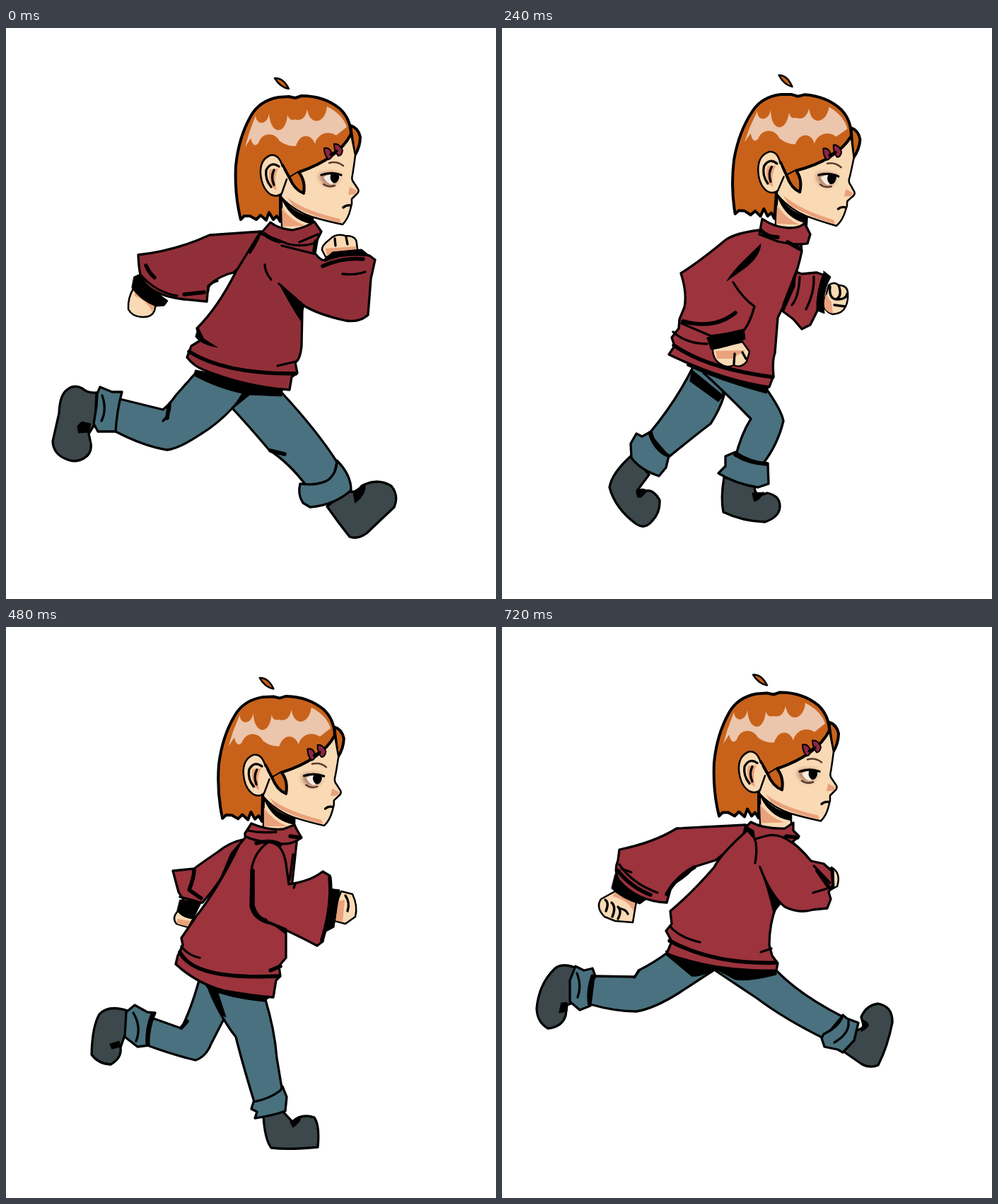
These frames come from a looping animation (693 by 808 pixels, 800 ms). An HTML page:

```html
<!DOCTYPE html>
<html lang="en">
<head>
<meta charset="utf-8">
<title>Running girl</title>
<style>
html, body { margin: 0; width: 100%; height: 100%; overflow: hidden; background: #fff; }
svg { display: block; width: 100%; height: 100%; }
path { stroke: #000; stroke-width: 3.3; stroke-linejoin: round; stroke-linecap: round; }
.j { fill: #4a717f; }
.b { fill: #3c484c; }
.s { fill: #9c333d; }
.r { fill: #912f38; }
.n { fill: #f9dab4; stroke-width: 2.5; }
.o { fill: #e9a27c; stroke: none; }
.k { fill: #000; stroke-width: 1; }
.l { fill: none; }
.t { fill: none; stroke-width: 5.5; }
.h { fill: #c8621a; stroke-width: 4; }
.a { fill: #c8621a; stroke-width: 2.5; }
.p { fill: #ebc5ac; stroke: none; }
.w { fill: #f4ece4; stroke: none; }
.c { fill: #8b2644; stroke-width: 2; }
.e { fill: #b07a64; stroke: none; filter: url(#soft); }
.m { fill: none; stroke: #5a3c30; stroke-width: 2.5; }
</style>
</head>
<body>
<svg id="stage" viewBox="0 0 693 808">
<defs><filter id="soft" x="-50%" y="-50%" width="200%" height="200%"><feGaussianBlur stdDeviation="3"/></filter></defs>
</svg>
<script>
// Every entry is a style letter followed by its path.
const head = [
  'n M390 238L390 290L434 290L434 262Z',
  'h M487 138Q498 141 501 154Q501 168 493 181Z',
  'n M488 150L494 180Q492 196 490 208Q488 215 492 219L498 228Q500 232 495 236L489 242L489 249L487 257Q484 270 476 278Q452 273 432 267Q406 258 388 238L392 190Z',
  'o M398 240Q420 258 472 270L474 276Q430 266 406 252Z',
  'o M390 254Q402 272 424 280L391 281Z',
  'k M387 234Q402 262 434 268L433 277Q400 272 387 234Z',
  'o M486 225L496 230L494 235L484 236Z',
  'e M443 207Q456 202 472 207Q468 224 455 223Q444 220 443 207Z',
  'w M449 211Q461 203 474 210Q470 220 459 221Q452 218 449 211Z',
  'k M460 207Q469 203 471 211Q469 220 463 219Q457 214 460 207Z',
  'l M446 208Q460 203 474 208',
  'm M449 221Q456 226 465 223',
  'm M457 191Q468 188 477 195',
  'l M477 254Q481 250 487 251',
  'h M332 271Q323 235 325 195Q329 155 346 125Q358 103 385 98L400 97L409 99L418 96Q450 96 472 114Q487 128 488 150Q470 185 414 204L401 212L391 194L388 240L388 274L383 266L378 271L372 261L368 272L360 265L354 271L345 266L337 266Z',
  'p M338 169L344 148L353 124C354 138 370 138 372 121C374 152 396 152 398 123C402 134 408 128 411 130C420 131 424 125 426 115C430 140 452 135 454 111Q476 122 482 140L467 152C455 144 440 150 437 164C432 150 416 148 410 167Q398 168 387 160C380 147 362 147 357 163Q350 171 346 156Z',
  'n M391 196Q386 178 374 180Q359 186 360 206Q362 228 375 236Q384 240 390 234L397 214',
  'o M373 200Q370 211 376 225L383 230Q378 211 385 199Z',
  'l M386 196Q375 188 368 201Q366 214 375 225',
  'l M379 201Q374 211 379 222',
  'h M414 204Q424 216 421 234Q408 229 401 212',
  'c M450 170Q458 168 461 178Q461 185 456 186Q450 180 450 170Z',
  'c M464 164Q472 163 476 173Q475 181 470 181Q464 174 464 164Z',
  'l M459 179L468 174',
  'a M380 71Q392 70 400 86Q388 84 380 71Z'
];

const legs = {
  land: [
    'j M270 486L240 520Q232 532 222 540L157 524L153 570Q195 592 228 597Q245 595 275 575Q300 560 322 536L340 514Z',
    'l M232 530Q233 546 222 556', 't M230 536L228 552',
    'b M128 516Q115 517 108 510Q95 503 84 514Q76 522 75 545L66 585Q67 603 85 610Q98 616 110 609Q122 602 120 588L117 574L126 560Z',
    'k M101 563L107 557L120 560L117 572L103 573Z',
    'j M129 517L133 508L150 515L164 515Q157 540 155 571L130 571L124 560L128 535Z',
    'l M136 520Q143 540 135 556',
    'j M320 538L345 514L390 516Q440 570 468 614L462 640L425 648Q400 615 372 597Q345 565 320 538Z',
    't M374 598L394 603',
    'b M454 677L482 655Q495 660 503 648Q525 636 545 648Q556 662 549 678L510 715Q497 724 486 720Q470 700 454 677Z',
    'k M491 656L508 645Q510 660 494 672Z',
    'j M416 645Q412 660 420 672L430 678Q465 675 488 654Q488 632 468 612Q468 630 455 640Q440 648 416 645Z',
    'k M268 484L392 508L390 521L345 519L320 539L334 517Q300 510 266 492Z'
  ],
  plant: [
    'j M266 480Q258 520 246 548L244 552L196 554L193 587Q230 608 262 608Q283 606 292 585L330 517Z',
    't M228 552L244 552',
    'b M165 545Q140 540 128 543Q122 560 120 615Q125 624 140 626L158 624Q168 615 165 600L160 580Z',
    'k M148 584L161 583L158 592L149 592Z',
    'j M163 543L175 538L184 546L200 544L193 556L193 600L184 603L166 598L160 580Z',
    'l M172 546Q182 566 175 590',
    'j M308 557L330 515L358 515Q375 580 384 634L345 648Q330 600 308 557Z',
    'k M316 512L331 517L325 541Q318 552 309 557Z',
    'b M356 672L366 725Q372 732 390 732L440 728Q448 710 447 688Q435 670 415 680Q405 690 395 682L391 662Z',
    'k M394 683L412 680L410 694L398 696Z',
    'j M334 645Q336 665 345 673Q375 680 398 662L402 650L388 626Q388 640 372 645Q355 650 334 645Z',
    'k M264 478L265 494Q310 512 357 521L362 508Z'
  ],
  pass: [
    'j M264 486L338 508Q328 590 314 646L272 648Q272 570 264 486Z',
    'b M268 662L264 715Q268 728 290 728L338 727Q350 720 346 700Q336 686 318 692L312 664Z',
    'k M304 695L320 690L318 703L306 706Z',
    'j M262 640Q292 648 320 636L324 662Q295 674 264 664Z',
    'j M304 502L358 512Q378 555 372 582Q350 605 276 638L262 602Q310 580 325 565Q312 535 304 502Z',
    'b M250 604Q228 602 216 616Q205 640 214 668Q228 676 240 666Q246 655 238 650L262 644Z',
    'j M250 600L268 592Q272 616 286 634L262 648L246 622Z',
    'k M264 482L264 496Q310 514 357 521L362 508Z'
  ],
  push: [
    'j M270 480Q245 530 208 574L236 607Q275 575 295 560Q308 540 314 520L304 488Z',
    'k M269 484L313 520L306 529L266 500Z',
    'b M184 604Q155 630 152 650Q160 680 190 702Q202 710 212 698Q224 686 223 668Q214 652 203 655L195 663L191 655L208 632Z',
    'k M190 657Q197 648 206 655L197 664L192 664Z',
    'j M182 588L190 574L198 578L211 571Q218 600 236 605L232 622L222 634Q195 625 183 608Z',
    't M209 573Q217 598 235 605',
    'j M285 485L372 508Q395 540 398 556Q390 590 368 618L330 608Q338 575 352 553L345 546Q320 520 285 488Z',
    'b M314 636Q309 665 313 685Q340 698 372 699Q392 692 393 678Q394 662 375 658Q362 664 358 655L356 646Z',
    'k M354 658L371 657Q365 668 357 670Z',
    'j M316 606L330 600Q350 614 376 616L377 645L362 650Q330 645 306 630L316 620Z',
    't M330 604Q350 616 374 617',
    'k M262 470Q310 490 377 508L374 517Q310 500 262 478Z'
  ],
  fly: [
    'j M222 458L190 484Q185 490 180 490L118 490L115 526Q170 540 208 540Q225 532 250 512L290 484Z',
    't M181 490L188 485',
    'b M84 492Q80 480 62 478Q50 482 45 500L24 560Q30 576 52 580Q68 578 71 565L70 535L84 526Z',
    'k M61 534L70 533L70 544L63 544Z',
    'j M84 492L92 476L105 481L116 476L122 490Q112 510 117 530L105 538L90 530L82 520Z',
    't M117 490Q111 510 116 528', 'l M95 485Q104 505 97 525',
    'j M284 485L374 476Q424 512 488 546L465 578Q420 560 385 538Q340 512 284 485Z',
    'b M495 595L508 563Q522 565 526 550Q527 520 540 513Q560 515 563 540Q562 575 545 606Q535 616 520 612L495 598Z',
    'k M522 563L526 535Q535 545 530 560Z',
    'j M457 575Q458 588 470 597L490 600Q505 590 508 570L508 550L488 540Q486 556 478 568Z',
    'l M497 548Q496 575 468 587',
    'k M216 456Q300 482 379 474L378 484Q330 492 286 486Q250 482 218 464Z'
  ],
  plant2: [
    'j M273 500Q262 540 248 568L206 553L200 592Q235 605 268 613Q283 608 290 590L308 555L300 515Z',
    't M248 567L256 558',
    'b M172 543Q145 534 132 548Q122 565 121 605Q130 618 148 619Q164 610 162 595L170 572Z',
    'k M147 590L160 586L162 594L150 597Z',
    'j M170 545L182 535L200 545L211 546Q200 570 202 592L186 594L168 580Z',
    'l M180 546Q192 566 184 586', 't M207 548Q199 568 200 590',
    'j M288 510L366 524Q380 570 383 610L391 658L352 675Q335 620 325 580Q305 555 288 515Z',
    'k M284 508L300 518L311 552L304 548Z',
    'b M364 692Q366 725 375 737Q400 740 441 736Q444 705 436 694Q418 688 405 700L392 686Z',
    'k M402 700L416 694Q418 700 406 708Z',
    'j M347 682L350 672Q372 668 388 656L391 650L397 665L395 685Q375 692 352 695L355 686Z',
    'k M276 498Q330 518 381 518L365 530Q315 525 286 512Z'
  ],
  push2: [
    'j M260 484Q235 535 202 572L230 602Q255 588 270 575Q300 545 322 508Z',
    'b M176 600Q150 622 146 640Q155 670 172 687L205 689Q220 680 219 662Q210 650 198 656L193 663L190 650L206 628Z',
    'k M190 652L201 650L204 656L193 664Z',
    'j M172 586L186 568L191 574L204 568Q210 590 232 600L228 622L216 632Q190 620 174 602Z',
    't M202 570Q210 590 230 600',
    'j M313 514L368 504Q395 530 403 553Q395 580 360 622L330 608Q340 580 350 558L352 551Q335 535 313 514Z',
    't M345 551L350 557',
    'b M303 632L304 680Q320 694 345 694L376 693Q384 685 382 668Q375 648 358 652L352 646Z',
    'k M348 656L359 650Q368 652 355 664Z',
    'j M302 622L316 602L328 606Q345 619 360 624L356 648Q325 648 302 632Z',
    'k M258 482Q310 498 372 500L370 510L325 509L314 518L309 508Q270 500 258 488Z'
  ],
  fly2: [
    'j M235 460Q215 475 193 486L188 495L130 494L125 534Q160 544 190 544Q215 540 250 518L302 484Z',
    'l M194 486L187 496',
    'b M104 482Q85 475 75 483Q52 505 49 540Q50 560 65 568Q85 566 90 550L92 535L100 532Z',
    'k M84 532L92 531L92 544L81 546Z',
    'j M96 500L104 480L116 486L128 483L132 494Q120 515 125 536L110 542L96 530Z',
    't M128 494Q121 515 124 534', 'l M106 490Q113 508 107 524',
    'j M300 485L386 484Q420 520 481 551L455 582Q400 555 360 525Q330 505 300 485Z',
    'b M482 600L500 572L512 566L508 552Q515 535 532 533Q553 537 552 560Q545 595 532 620Q520 625 508 618Z',
    'k M508 572L511 556Q524 562 514 569Z',
    'j M452 582L456 594L475 598L482 602L498 585L504 560L488 554L482 549Q478 565 455 576Z',
    'l M490 558Q492 575 470 588',
    'k M232 458L300 478L388 484L388 492Q350 502 330 499L302 484Q280 496 268 494L232 464Z'
  ]
};

const upper = {
  land: [
    'n M180 369Q172 382 173 398Q178 408 192 409Q206 410 210 400L212 390Z',
    'o M182 373L210 391L207 402Q200 386 182 379Z',
    'k M181 352L190 348Q208 372 229 386L224 393L212 394Q190 385 178 368Z',
    'r M360 288L288 293Q240 315 187 321Q188 345 191 351Q200 378 252 384L284 387L286 365Q302 350 322 346L352 318Z',
    't M198 336Q202 346 210 353', 'l M190 349Q212 374 242 379', 't M252 377L280 374', 'l M286 372Q285 362 299 358',
    'r M360 288L325 345Q300 395 270 425L275 442L262 450L256 466Q265 478 280 484Q340 508 401 512L404 494L412 488L409 473Q416 470 418 450L419 400L436 325L441 296Z',
    'k M272 424L280 440L299 452Q274 447 268 437Z',
    't M259 458Q310 490 410 489', 'l M384 478L410 472',
    'n M447 314Q446 308 458 299Q466 290 480 294Q496 294 496 305L498 320L452 324Z',
    'o M452 312L494 309L498 320L454 322Z', 'l M465 298L466 308', 'l M481 296L483 306',
    'k M450 327L462 317L503 313L514 322L452 334Z',
    'r M386 362L420 392Q440 405 480 414Q500 417 512 406L516 355L522 328L514 322Q480 318 456 327Q448 333 438 320L390 308',
    'k M386 361L420 390L418 416Q402 392 386 361Z',
    't M448 337Q476 324 505 327', 'l M476 348Q495 350 508 345',
    'l M366 335Q366 345 375 356', 'l M360 290Q352 308 345 318',
    'r M362 289L374 275Q385 284 405 286Q425 282 436 274L446 288L438 304Q420 310 400 306Q380 298 362 292Z',
    't M366 292Q375 299 387 302', 'l M415 303L441 292', 't M438 302L436 316'
  ],
  plant: [
    'n M238 408Q232 420 233 432Q245 440 260 434L268 412Z',
    'o M236 424L260 430L254 437Q242 437 236 432Z',
    'k M238 397Q255 406 284 400L272 415Q250 416 238 406Z',
    's M355 297Q320 300 300 312Q270 340 247 370L234 378Q240 395 250 402L280 405L330 330Z',
    'l M247 372Q260 390 284 392', 't M238 380Q252 396 275 398',
    's M366 288L350 298Q320 345 300 365Q280 390 270 420Q262 435 255 440L252 458L247 463L246 470Q300 500 387 515L392 494L402 490L400 474Q408 470 409 440L410 410L420 350Q435 310 432 294Z',
    'k M264 418L270 437L257 438Z', 't M252 456Q310 486 400 490', 'l M382 478L400 472',
    'n M483 372L495 365Q510 368 510 380Q518 392 511 402Q508 416 495 416L484 410Z',
    'o M484 373L492 372L490 411L484 409Z', 'l M494 367L498 380L510 376', 'l M500 402L511 401',
    'k M460 361L470 366L483 370Q477 392 483 417L470 422Q478 390 460 361Z',
    's M380 301Q394 308 395 325L395 362Q410 368 425 362L445 351Q455 354 470 370L470 410L465 432L452 447Q410 430 375 418Q352 412 346 405L344 345Q345 318 367 302',
    't M446 364Q464 384 460 402L446 427', 't M456 416L460 433', 't M398 364L420 364',
    'k M376 417L410 431L409 439Q392 433 376 417Z', 'l M424 345L420 358',
    's M364 289L374 273Q385 285 405 287Q425 284 432 276L442 288L437 299Q415 309 390 301L368 295Z',
    'l M366 290Q382 294 390 301', 't M363 300L384 302', 't M413 304L434 298'
  ],
  push: [
    'n M462 364Q470 358 476 364Q488 364 489 374Q490 386 486 394Q482 404 468 405Q456 402 455 390Z',
    'o M458 376L466 388L468 404Q456 402 455 390Z', 'l M464 366Q462 382 472 384Q482 380 476 364', 'l M474 384Q487 384 488 376', 'l M470 392L485 394',
    's M416 345L424 348L445 346L456 350Q445 375 446 400L436 420L424 426L412 412L396 400Z',
    'k M455 344L465 352Q452 375 456 404L446 400Q444 370 455 346Z',
    'l M421 352Q420 380 410 392', 'l M441 352Q442 375 430 398',
    's M364 286Q330 290 316 300Q280 330 253 347Q262 375 258 395L251 412L250 425L240 438L244 450L236 462Q310 498 378 508L384 492Q382 470 386 460L390 410Q415 360 424 316L422 296Z',
    'k M416 342L414 366L398 402L397 391Z',
    't M243 449Q290 482 383 494', 'l M242 430Q260 447 290 447',
    'k M366 306Q365 322 347 337L318 358Q326 345 340 331Z',
    's M327 360Q340 382 357 394Q350 420 340 430L296 436L254 418',
    't M256 415Q300 427 330 403',
    'n M298 454Q298 470 310 476Q318 482 328 477Q338 482 346 472L350 458L340 444Z',
    'o M302 457L344 456L326 468L304 468Z', 'l M329 461L328 475', 'l M340 459L345 468',
    'k M290 438L342 426L344 440Q320 452 296 455Z',
    's M364 292L368 270Q385 282 405 283Q422 283 428 276L436 292L432 305Q415 308 390 302Z',
    't M366 286Q375 296 390 296', 't M404 303L422 313'
  ],
  fly: [
    'n M398 420Q388 426 389 434Q392 440 398 438Q400 448 412 446Q420 453 430 448Q442 450 446 440L446 426Z',
    'o M402 421Q425 430 444 425L442 434Q415 432 396 428Z',
    's M412 306L458 370L460 375L456 382L470 412L462 430L440 420L398 422L379 412L390 385L388 360Z',
    't M397 420Q420 408 444 422L461 429', 'l M452 374Q430 382 414 397', 'l M456 387L440 403', 'l M393 390L409 375',
    'n M170 372L155 385Q151 396 155 402Q162 402 168 405Q174 411 180 408Q188 412 193 406L196 390Z',
    'o M172 374L196 391L193 402Q180 382 168 380Z',
    's M350 272L300 310Q260 370 238 398L222 418L226 430L214 442Q220 455 240 462Q310 488 376 472L376 450L372 440L374 390Q385 340 412 308L418 292Z',
    'k M408 305L413 314Q408 345 387 366Q402 340 408 305Z',
    't M222 432Q285 486 375 460', 'l M353 451L376 447',
    'k M176 358Q185 380 208 380L203 390Q180 388 172 374Z',
    's M345 268Q300 282 228 290L178 308Q170 330 180 360Q185 375 210 380Q235 385 255 378Q275 345 305 336Q340 332 356 310',
    'k M305 334Q270 350 242 390L241 380L257 373Q273 344 305 334Z',
    't M196 362Q215 370 238 367', 'l M180 314Q184 340 193 350',
    's M345 272L355 262Q375 276 408 270L420 278L423 292Q405 302 390 296Q365 290 345 272Z',
    'l M352 268Q375 286 420 286', 't M348 274Q360 288 378 292'
  ],
  plant2: [
    'n M243 402Q234 412 241 420L258 425L266 410Z', 'o M242 413L261 416L257 424L242 420Z',
    'k M246 386Q258 390 278 386L265 413Q250 412 242 402Z',
    's M338 300Q315 305 300 318Q275 335 266 342L236 345L244 375L252 388L278 390Q300 365 320 330Z',
    't M266 344Q266 354 259 372L276 384', 'l M246 382L270 388',
    's M345 290L330 308Q300 370 270 408L248 440L250 450L243 465L240 477Q270 505 310 515Q350 522 378 524L382 500L388 494L386 480L396 468L396 428L405 360L412 296Z',
    'k M335 300L321 326L298 368L318 320Z',
    't M246 460Q265 500 386 494', 'l M248 452Q258 465 274 468', 't M374 486L388 480',
    'n M470 384L474 374L490 378Q498 395 494 410L480 420L465 416Z', 'o M469 388L479 386L476 418L466 415Z', 'l M480 380Q487 390 483 402',
    'k M457 370L472 372L464 425L447 434Z',
    's M378 306Q392 310 396 335L400 364Q430 360 448 346L458 352L460 395L450 430L448 445L440 451Q400 430 375 420Q350 415 346 395L347 345Q350 320 370 305',
    't M458 355Q462 395 447 443', 'l M407 369L409 364', 't M349 345L349 394Q354 412 367 415',
    'k M366 414L397 427L396 435Q380 422 366 414Z', 'l M406 322L401 358',
    's M338 292L347 278Q370 288 392 286L408 280L412 288L418 298Q400 312 380 304Q355 305 338 296Z',
    'l M342 288Q360 292 382 290', 't M354 306Q375 300 388 308', 't M402 296L416 298'
  ],
  push2: [
    's M335 290Q300 310 275 332Q262 350 262 392L268 390Q300 340 335 290Z',
    's M345 288L330 298Q295 350 262 388L250 420Q238 425 234 437L242 448L240 468Q290 495 374 506L376 488L382 475L378 465L378 425L394 375L404 308Z',
    'k M335 292L296 346L261 392L263 376Z',
    't M240 452Q290 485 376 488', 'l M252 422Q260 438 283 445', 't M250 420L260 426',
    'n M469 386L484 390Q495 400 491 425L484 436L464 428Z', 'o M470 410L489 422L483 435L466 429Z', 'l M483 404Q488 414 483 424', 'l M470 387L478 396L484 389',
    'k M455 380L470 388L466 430L454 434Z',
    's M378 308Q392 312 395 335L398 370Q412 375 430 365L440 362L455 372L458 385L456 415L440 450L432 455Q410 440 380 425Q355 415 340 405L338 340Q340 312 358 303',
    't M437 366Q450 385 444 412L432 450', 'l M444 366Q458 380 456 402',
    'k M356 412L378 422L378 438Q368 420 356 412Z', 'l M396 318L393 360',
    's M336 290L348 276Q365 288 390 284L402 280L410 290L406 304L408 315L398 318Q380 306 358 302Z',
    'l M342 288Q365 296 392 292', 't M358 302L376 306', 'l M388 304L406 304'
  ],
  fly2: [
    'n M160 374L140 385Q132 397 145 410L160 416L185 418L190 388Z',
    'o M160 376L188 391L186 402Q178 386 156 381Z', 'l M146 386Q152 390 147 402', 'l M155 390Q162 396 156 410', 'l M164 396Q170 402 164 413', 'l M166 398Q176 400 178 406',
    'k M160 350Q180 373 206 384L195 392Q170 385 155 370Z',
    's M345 280L247 285Q215 305 166 315L164 330Q158 345 165 358Q190 388 233 390L240 365Q265 350 270 340L302 330L340 300Z',
    'l M166 336Q184 363 220 376', 't M164 345Q182 368 210 379', 'l M169 342L183 347', 't M233 378Q246 354 272 340',
    'n M466 340Q480 348 474 367L464 372Z',
    's M350 285Q310 320 300 340Q270 375 238 402L240 420L232 430L240 445L233 462Q300 488 388 486L390 476L382 465L378 450Q378 420 388 395L392 350L412 292Z',
    't M237 444Q300 478 388 475', 'l M238 424Q252 440 280 446', 'l M366 460L381 455',
    'k M462 340L469 342L470 370L462 374Z',
    's M365 340Q380 380 400 396Q420 406 440 400L460 398L465 385L462 375L468 365L466 345L455 335L437 331Q420 310 400 297',
    'k M364 338Q376 372 394 392L384 405Q376 370 364 338Z',
    'l M441 338L464 362', 't M446 345L462 368', 'l M440 376L460 370',
    'l M350 285Q364 302 358 334',
    's M344 284L352 276Q370 286 400 285L412 277L412 288L420 296L410 305Q390 290 372 296L358 300Z',
    'k M344 281L356 288L358 301Z', 't M402 296L418 298'
  ]
};

// legs, legs shift, upper body, upper shift, head x, y, tilt
const poses = [
  ['land', '', 'land', '', 0, 0, 0],
  ['plant', '', 'plant', '', 0, 0, 3.5],
  ['pass', '', 'plant', 'translate(-1 0)', 0, -1, 3.7],
  ['push', '', 'push', '', 0, -1.5, 4],
  ['fly', '', 'fly', '', -19, -8.5, 1.7],
  ['land', 'translate(-23 0)', 'push', 'translate(-24 4) rotate(-6 400 290)', -24, -1, 1],
  ['plant2', '', 'plant2', '', -25, 2, 1.3],
  ['pass', 'translate(-2 4)', 'push2', 'translate(1 5)', -25, 3, 1.5],
  ['push2', '', 'push2', '', -25, 2, 1.8],
  ['fly2', '', 'fly2', '', -25, -3.5, 0]
];

const STEP = 80;
const stage = document.getElementById('stage');
const group = (shapes, move) => `<g transform="${move}">` +
  shapes.map(s => `<path class="${s[0]}" d="${s.slice(2)}"/>`).join('') + '</g>';

const figures = poses.map(([leg, legMove, top, topMove, x, y, tilt]) => {
  const g = document.createElementNS('http://www.w3.org/2000/svg', 'g');
  g.innerHTML = group(legs[leg], legMove) +
    group(head, `translate(${x} ${y}) rotate(${tilt} 425 235)`) +
    group(upper[top], topMove);
  stage.append(g);
  return g;
});

function draw(time) {
  const now = Math.floor(time / STEP) % poses.length;
  figures.forEach((g, i) => g.style.display = i === now ? '' : 'none');
}

const start = performance.now();

function tick() {
  draw(performance.now() - start);
  requestAnimationFrame(tick);
}

draw(0);
requestAnimationFrame(tick);
</script>
</body>
</html>
```
